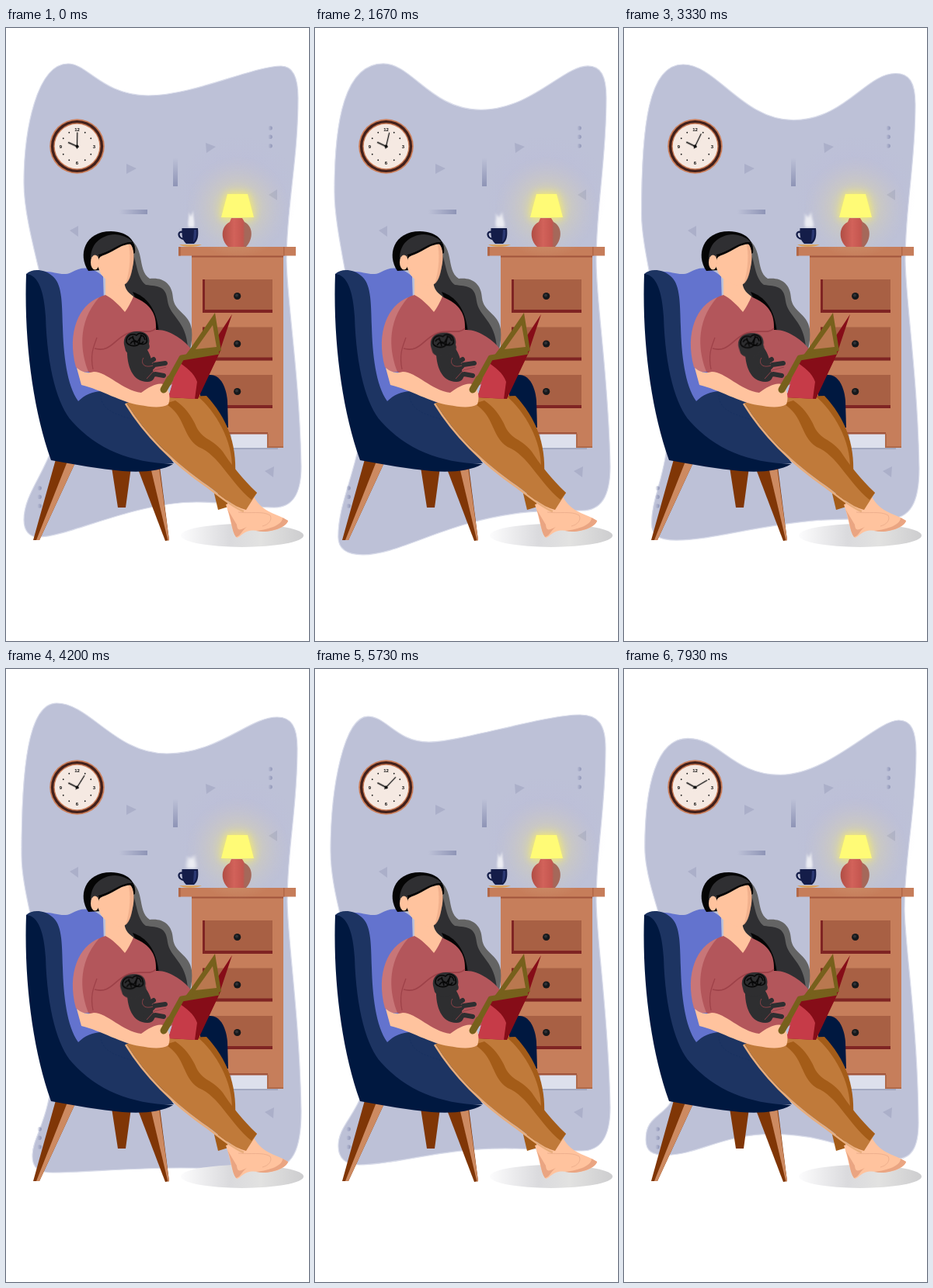
These frames come from a looping animation (390 px wide and 790 px high, 8000 ms). An HTML page without scripts:

```html
<!DOCTYPE html>
<html lang="en">
<head>
<meta charset="utf-8">
<title>Reading by lamplight</title>
<style>
html, body { margin: 0; width: 100%; height: 100%; overflow: hidden; background: #fff; }
svg { display: block; width: 100vw; height: 100vh; }
text { font: 700 6px Arial, "Liberation Sans", sans-serif; text-anchor: middle; fill: #111; }
.skin { fill: #ffc39e; }
.shade { fill: #eaa582; }
.navy { fill: #001840; }
.wood { fill: #803606; }
.oak { fill: #cd8a61; }
.pants { fill: #c07a3a; }
.fold { fill: #a45c18; }
.dress { fill: #b3565b; }
.hair { fill: #2f2f32; }
.jet { fill: #050505; }
.deco { fill: #a6aac4; opacity: .75; }
.unborn { fill: #2e2e30; }
.limb { fill: none; stroke: #2e2e30; stroke-width: 6; stroke-linecap: round; stroke-linejoin: round; }
.blob, .minute, .hour, .head, .steam { animation: 8s linear infinite; }
.blob { fill: #bdc1d7; stroke: #d9dcea; stroke-width: 1.2; animation-name: morph; }
.minute, .hour { stroke: #111; stroke-linecap: round; transform-origin: 91.5px 152.5px; }
.minute { stroke-width: 1.3; animation-name: minute; }
.hour { stroke-width: 1.7; animation-name: hour; }
.head { transform-origin: 172px 428px; animation-name: nod; }
.steam { transform-origin: 238px 258px; animation-name: steam; }

@keyframes minute { from { transform: rotate(1deg); } to { transform: rotate(60deg); } }
@keyframes hour { from { transform: rotate(-66deg); } to { transform: rotate(-61deg); } }
@keyframes nod {
  0%, 71.6%, 100% { transform: none; }
  10.9% { transform: translate(-1px, 1px) rotate(-1deg); }
  30.9%, 52.5% { transform: translate(-3.5px, 2px) rotate(-3deg); }
  84.1% { transform: translate(1px, 0); }
}
@keyframes steam {
  0%, 71.6%, 100% { transform: scale(.8, 1); }
  10.9%, 52.5%, 84.1% { transform: scale(1.25, .85); }
  30.9% { transform: scale(1, 1) skewX(6deg); }
}
@keyframes morph {
  0% { d: path("M80 46C105 46 125 87 183 87S318 49 354 49C369 49 376 62 376 90C376 170 361 230 361 300C362 355 378 450 380 565C380 602 368 618 345 618C315 618 290 611 245 611C165 611 80 656 42 656C30 656 23 648 23 634C23 590 70 560 70 480C70 380 23 270 23 200C23 130 40 46 80 46Z"); }
  10.9% { d: path("M88 43C120 43 130 84 200 84S322 45 352 45C368 45 374 58 374 90C374 170 361 230 361 300C362 355 378 450 380 565C380 605 370 622 345 622C315 622 300 619 270 619C165 619 100 674 49 674C34 674 25 666 25 650C25 600 68 560 68 480C68 380 25 260 25 185C25 115 38 43 88 43Z"); }
  21.2% { d: path("M88 46C125 46 150 106 214 106S320 49 351 49C368 49 375 62 375 90C375 170 362 230 362 300C362 355 378 450 380 565C380 604 368 622 343 622C315 622 300 622 275 624C170 634 112 679 62 679C42 679 30 672 30 656C30 605 61 560 61 490C61 390 25 275 25 212C25 120 38 46 88 46Z"); }
  30.9% { d: path("M87 50C130 50 165 128 229 128S310 55 350 55C367 55 375 65 375 95C375 170 362 230 362 300C363 355 378 450 380 565C380 604 368 621 343 621C315 621 300 622 275 626C180 640 125 671 75 671C48 671 37 665 37 650C37 600 55 570 55 500C55 400 25 290 25 240C25 120 35 50 87 50Z"); }
  52.5% { d: path("M65 44C108 44 140 109 207 109S313 62 349 62C367 62 375 74 375 102C375 180 362 230 362 300C363 355 378 450 380 570C380 618 370 645 335 645C305 645 270 643 225 643C155 643 100 649 60 649C42 649 34 643 34 628C34 600 60 580 60 500C60 400 20 300 20 240C20 130 28 44 65 44Z"); }
  71.6% { d: path("M68 61C92 61 105 94 146 94S295 59 341 59C365 59 374 72 374 102C374 180 362 230 362 300C363 355 378 450 380 565C380 603 368 621 343 621C310 621 290 618 245 618C160 618 105 639 57 639C39 639 30 630 30 615C30 580 70 570 70 490C70 420 20 310 20 235C20 150 38 61 68 61Z"); }
  84.1% { d: path("M83 77C110 77 125 108 173 108S310 66 348 66C367 66 376 78 376 106C376 190 361 250 361 310C362 360 378 460 380 575C380 610 368 626 345 626C310 626 280 607 213 607C145 607 100 633 57 633C40 633 30 628 30 615C30 570 75 580 75 490C75 390 23 290 23 240C23 150 40 77 83 77Z"); }
  100% { d: path("M82 90C125 90 140 138 203 138S326 66 354 66C370 66 376 80 376 108C376 180 361 240 361 310C362 360 378 460 379 585C379 617 370 632 350 632C310 632 270 599 190 599C125 599 95 626 53 626C36 626 28 621 28 606C28 560 78 590 78 480C78 380 27 290 27 230C27 150 42 90 82 90Z"); }
}
</style>
</head>
<body>
<svg viewBox="0 0 390 790">
  <defs>
    <radialGradient id="glow">
      <stop offset=".2" stop-color="#fff45c" stop-opacity=".5"/>
      <stop offset=".5" stop-color="#f0e68c" stop-opacity=".24"/>
      <stop offset="1" stop-color="#d9d0c0" stop-opacity="0"/>
    </radialGradient>
    <radialGradient id="haze">
      <stop offset="0" stop-color="#b9a8e0" stop-opacity=".18"/>
      <stop offset="1" stop-color="#b9a8e0" stop-opacity="0"/>
    </radialGradient>
    <linearGradient id="fade">
      <stop offset="0" stop-color="#8e94b6" stop-opacity="0"/>
      <stop offset="1" stop-color="#8e94b6"/>
    </linearGradient>
    <linearGradient id="drop" href="#fade" x2="0" y2="1"/>
    <linearGradient id="floor">
      <stop offset="0" stop-color="#fcfcfd"/>
      <stop offset=".4" stop-color="#dadadd"/>
      <stop offset=".65" stop-color="#e2e2e1"/>
      <stop offset="1" stop-color="#cdcdcf"/>
    </linearGradient>
    <linearGradient id="clay">
      <stop offset="0" stop-color="#b04e45"/>
      <stop offset=".4" stop-color="#d2625a"/>
      <stop offset=".7" stop-color="#c4564f"/>
      <stop offset=".78" stop-color="#a5685a"/>
      <stop offset="1" stop-color="#a5685a"/>
    </linearGradient>
    <filter id="soft" x="-50%" width="200%"><feGaussianBlur stdDeviation="1.6"/></filter>
    <filter id="blur" x="-50%" y="-50%" width="200%" height="200%"><feGaussianBlur stdDeviation="4"/></filter>
    <circle id="dot" r="2.8" fill="url(#fade)"/>
    <g id="dots"><use href="#dot"/><use href="#dot" y="11.3"/><use href="#dot" y="23"/></g>
    <g id="drawer">
      <path d="M253 324H343V367H253Z" fill="#a86044"/>
      <path d="M253 324H256V363H343V367H253Z" fill="#7f2423"/>
      <circle cx="297.7" cy="345.5" r="4.6" fill="#16181b"/>
      <circle cx="297" cy="344.5" r="2" fill="#303236"/>
    </g>
    <circle id="tick" cx="91.5" cy="132" r=".9" fill="#111"/>
    <g id="ticks">
      <use href="#tick" transform="rotate(30 91.5 152.5)"/>
      <use href="#tick" transform="rotate(60 91.5 152.5)"/>
    </g>
  </defs>

  <path class="blob"/>
  <circle cx="298" cy="215" r="78" fill="url(#haze)"/>

  <!-- wall ornaments -->
  <path class="deco" d="M155 175L168 181L155 188ZM257 148L270 153L258 161ZM349 208V222L338 215ZM93 255V269L82 261ZM345 565L344 579L333 571Z"/>
  <rect x="215" y="167" width="6" height="37" fill="url(#drop)"/>
  <rect x="146" y="234" width="36" height="6" fill="url(#fade)"/>
  <use href="#dots" x="340" y="129"/>
  <use href="#dots" x="43" y="593"/>

  <!-- clock -->
  <g>
    <circle cx="91.5" cy="152.5" r="35.3" fill="#cb7d58"/>
    <circle cx="91.5" cy="152.5" r="33.6" fill="#42201b"/>
    <circle cx="91.5" cy="152.5" r="30.2" fill="#c97a55"/>
    <circle cx="91.5" cy="152.5" r="28.8" fill="#f5e9e2"/>
    <use href="#ticks"/>
    <use href="#ticks" transform="rotate(90 91.5 152.5)"/>
    <use href="#ticks" transform="rotate(180 91.5 152.5)"/>
    <use href="#ticks" transform="rotate(270 91.5 152.5)"/>
    <text x="91.5" y="133">12</text><text x="113.5" y="154.5">3</text>
    <text x="91.5" y="176">6</text><text x="70.5" y="154.5">9</text>
    <path class="hour" d="M91.5 154V140.5"/>
    <path class="minute" d="M91.5 155V135"/>
    <circle cx="91.5" cy="152.5" r="1.9" fill="#111"/>
  </g>

  <!-- dresser -->
  <path d="M290 523H337V541H290Z" fill="#dde0ec"/>
  <path d="M290 542H350" stroke="#9ba0ba" stroke-width="1.5"/>
  <path d="M239 293H357V541H336V523H239Z" fill="#c67e5b"/>
  <path d="M239 293H357V295.5H239ZM239 521H337V523.5H239Z" fill="#a2553c"/>
  <path d="M336 523V541H357V539H338V523Z" fill="#b06a4a"/>
  <path d="M222 282H373V293.5H222Z" fill="#c67d5a"/>
  <path d="M222 282H225V293.5H222ZM357 282H358.5V293.5H357Z" fill="#b26746"/>
  <use href="#drawer"/>
  <use href="#drawer" y="61.5"/>
  <use href="#drawer" y="123"/>

  <!-- lamp -->
  <circle cx="298" cy="231" r="66" fill="url(#glow)"/>
  <path d="M284 213H312L320 245H276Z" fill="#fff45c" opacity=".6" filter="url(#blur)"/>
  <path d="M290 245H304L307 250C319 256 318 273 309 282H286C276 273 276 256 288 250Z" fill="url(#clay)"/>
  <path d="M285 214H311L319 244H277Z" fill="#fffb76"/>

  <!-- cup -->
  <path class="steam" filter="url(#soft)" fill="#fff" opacity=".7" d="M234 257C232 249 236 244 234 237L238 243L242 235C241 244 245 249 243 257Z"/>
  <path d="M223 279H252Q247 282 237 282T223 279Z" fill="#d9a25f"/>
  <path d="M228 263C220 261 221 271 229 272" fill="none" stroke="#141d49" stroke-width="2.3"/>
  <path d="M226.5 258H247C248 267 247 274 242 278H232C227 274 226 267 226.5 258Z" fill="#141d49"/>
  <path d="M242 260H245C246 268 244 273 241 276Z" fill="#2b3872"/>

  <ellipse cx="304" cy="654" rx="79" ry="15" fill="url(#floor)"/>

  <!-- chair -->
  <path class="wood" d="M136 566H161L154 618H144ZM64 556H91L43 660H35Z"/>
  <path class="oak" d="M80 556H91L43 660H39Z"/>
  <path class="wood" d="M169 566H198L210 660L205 661Z"/>
  <path class="oak" d="M186 566H197L210 660L208.5 661Z"/>
  <path class="navy" d="M250 452C266 440 282 450 285 480L286 515H250Z"/>
  <path d="M45 314C60 312 72 321 84 315C98 307 110 307 125 320L130 480L85 500L60 400Z" fill="#6373ce"/>
  <path d="M26 317C34 309 50 311 59 319C72 329 72 350 73 385C74 420 78 460 93 481C101 473 112 468 124 468C148 468 163 486 178 505L216 561L150 566L58 540Z" fill="#1d3462"/>
  <path class="navy" d="M26 317C42 318 49 340 51 372C53 440 67 487 85 507C117 543 160 560 215 562C200 571 175 573 150 571C120 568 90 563 58 557C34 490 23 400 26 317Z"/>
  <path d="M122 473C122 496 150 500 182 510" fill="none" stroke="#16305f" stroke-width=".7" stroke-dasharray="2 2"/>

  <!-- hair behind -->
  <path d="M152 268C182 280 167 311 185 323C202 321 214 329 215 348C217 366 236 368 239 388C240 398 239 406 237 414L190 395Z" fill="#646464"/>
  <path class="hair" d="M140 268C174 276 161 316 180 331C196 333 206 332 208 352C211 372 232 377 234 412L188 396L150 346Z"/>
  <path class="jet" d="M163 340C180 346 194 360 197 394L185 392Z"/>
  <path class="jet" d="M106 313C92 293 101 262 135 262C158 262 168 276 166 290L122 312Z"/>

  <!-- legs -->
  <path class="fold" d="M268 600L273 621L286 617L283 600Z"/>
  <path class="fold" d="M232 475L258 474C284 502 297 535 295 575L270 570Z"/>
  <path class="skin" d="M283 614C290 634 290 648 297 657C303 656 306 645 325 648C345 651 362 642 363 635C350 626 330 625 319 604Z"/>
  <path class="shade" d="M285 620C291 634 290 648 296 656C302 655 303 648 310 643C300 648 298 648 297 640ZM322 648C340 652 361 643 363 635L356 631C356 640 340 646 322 648Z"/>
  <path d="M299 624C315 626 330 622 340 628C343 634 338 640 330 642" fill="none" stroke="#eeb08e" stroke-width="1"/>
  <path d="M154 484C181 528 218 563 260 592C276 604 292 618 306 623" fill="none" stroke="#e8ad7c" stroke-width="2.5"/>
  <path class="pants" d="M155 483L212 476L246 474C270 494 292 532 291 568L323 599L309 621C292 617 276 602 260 590C218 561 181 526 155 483Z"/>
  <path class="fold" d="M205 484C232 500 226 526 248 540C275 551 287 584 316 608L323 599C304 581 288 560 279 546C265 528 254 532 245 514C239 500 230 488 218 480Z"/>

  <!-- torso -->
  <path class="dress" d="M128 344C100 352 86 385 90 436L113 446C112 455 150 470 170 472C200 472 235 455 240 416C230 402 210 388 193 389C194 370 188 356 163 346Z"/>
  <path d="M120 347C94 357 78 392 90 437C96 443 101 444 106 443C97 420 90 381 120 347Z" fill="#c87678"/>
  <path d="M114 413C135 419 139 400 158 393C172 388 186 395 193 387" fill="none" stroke="#9d4148" stroke-width="1.8"/>
  <path d="M112 440C108 420 113 410 117 399" fill="none" stroke="#9d4148" stroke-width="1.2"/>
  <path class="skin" d="M128 316V344C136 348 146 357 153 366C157 361 161 353 164 346C156 340 153 336 152 326Z"/>
  <path class="skin" d="M117 294C138 290 143 278 157 276C165 280 165 293 164 302C161 318 159 328 150 332C138 332 123 324 119 309Z"/>
  <path class="shade" d="M157 276C164 280 165 293 164 302C162 316 160 325 154 330C160 310 161 290 157 276Z" opacity=".6"/>
  <path class="hair" d="M109 300C108 278 122 267 140 266C153 267 161 272 164 278C148 275 138 288 119 292L116 302Z"/>
  <path d="M118 304C117 297 119 294 124 292C140 287 146 277 163 277" fill="none" stroke="#050505" stroke-width="2.5"/>
  <ellipse class="skin" cx="114.5" cy="302" rx="5.5" ry="9.5"/>

  <!-- unborn child -->
  <path class="unborn" d="M156 412C155 436 163 456 182 456C190 456 193 450 190 444C187 436 190 426 180 412Z"/>
  <path class="limb" d="M176 436L190 427M180 446L191 434L205 432M180 452L192 446L203 448"/>
  <path d="M177 425C173 431 177 439 189 435M181 452L191 441L206 437" fill="none" stroke="#8f4349" stroke-width="1"/>
  <g class="head">
    <path class="unborn" d="M152 408C150 396 160 390 170 391C181 391 186 398 184 407C186 412 184 415 180 415C176 424 158 424 154 416Z"/>
    <path d="M155 405C154 396 162 393 168 396C172 391 181 394 181 401C183 407 176 409 172 406C169 411 159 411 155 405M158 402Q162 396 165 402T172 400T179 402M160 407Q165 400 169 405T177 404M163 397L166 408M174 395L171 407" fill="none" stroke="#080808" stroke-width="1.6"/>
  </g>

  <!-- book -->
  <path d="M291 369L274 420L246 478L268 404Z" fill="#860d18"/>
  <path d="M225 427L276 416L247 478L209 476Z" fill="#860d18"/>
  <path d="M222 430C232 438 242 444 246 456L243 478L209 476Z" fill="#c63b48"/>
  <path d="M236 415L269 367L277 416L226 428Z" fill="#77601c"/>
  <path d="M244 414L266 383L271 411Z" fill="#b9784f"/>
  <path d="M204 465L226 425L274 417" fill="none" stroke="#77601c" stroke-width="7" stroke-linejoin="round"/>

  <!-- arm -->
  <path class="skin" d="M91 438C100 445 107 445 113 443C130 443 150 467 174 470C184 463 194 457 202 459C211 464 212 478 209 485C198 491 185 488 172 486C150 483 122 466 97 460Z"/>
  <path d="M203 466L211 452" fill="none" stroke="#77601c" stroke-width="9" stroke-linecap="round"/>
</svg>
</body>
</html>
```
